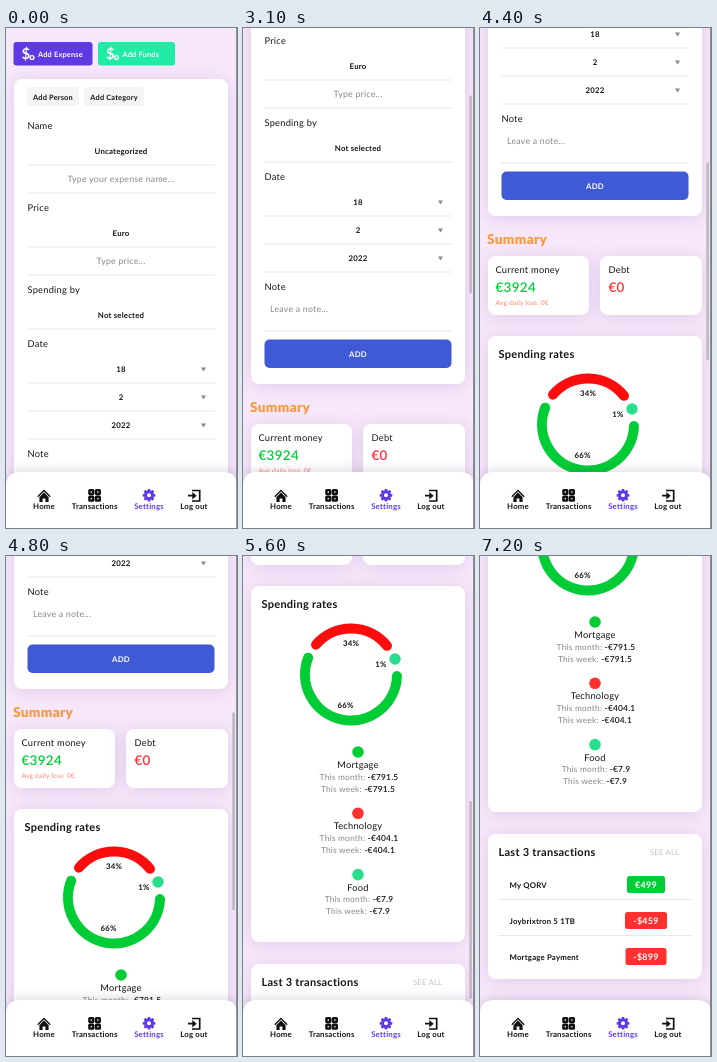
Write an HTML page that moves like this. It is 231x500 px and loops after 9.8 s.

```html
<!DOCTYPE html>
<html lang="en">
<head>
<meta charset="utf-8">
<title>Expense tracker</title>
<style>
  html, body { margin: 0; width: 100%; height: 100%; overflow: hidden; background: #f7e8fb; }
  svg { display: block; width: 100vw; height: 100vh; }
  text { font-family: Lato, "Open Sans", sans-serif; letter-spacing: .025em; fill: #151515; text-rendering: geometricPrecision; }
  .card { fill: #fff; filter: drop-shadow(0 2px 9px rgba(110, 60, 140, .17)); }
  .nav { fill: #fff; filter: drop-shadow(0 -1px 6px rgba(70, 40, 90, .2)); }
  .label { font-size: 9.3px; }
  .bold { font-size: 7.8px; font-weight: 700; }
  .small { font-size: 7.4px; font-weight: 700; }
  .hint { font-size: 8.8px; fill: #888; }
  .title { font-size: 11px; font-weight: 700; }
  .summary { font-size: 13.6px; font-weight: 900; fill: #fb9a3c; }
  .amount { font-size: 13.4px; font-weight: 600; }
  .loss { font-size: 6.7px; fill: #ff866b; }
  .period { font-size: 8.4px; fill: #888; }
  .period tspan { fill: #151515; font-weight: 600; }
  .more { font-size: 7.7px; fill: #c2c2c2; }
  .badge { font-size: 9px; font-weight: 700; fill: #fff; }
  .dollar { font-size: 15px; font-weight: 700; fill: #fff; }
  .white { fill: #fff; }
  .active { fill: #5f39e4; }
</style>
</head>
<body>
<svg viewBox="0 0 231 500" preserveAspectRatio="none">
  <rect width="231" height="500" fill="#f7e8fb"/>
  <g id="page"></g>
  <rect id="thumb" x="226.3" width="2.6" height="198" rx="1.3" fill="#bcb8bf"/>
  <g id="nav"></g>
  <rect x="230.2" width=".8" height="500" fill="#777"/>
</svg>
<script>
const GREEN = '#00cd35', RED = '#ff3030', TEAL = '#2ade8c', PURPLE = '#5f39e4';

const text = (x, y, content, style, anchor = 'start', extra = '') =>
  `<text x="${x}" y="${y}" class="${style}" text-anchor="${anchor}" ${extra}>${content}</text>`;
const centered = (x, y, content, style) => text(x, y, content, style, 'middle');
const box = (x, y, w, h, r, fill) =>
  `<rect x="${x}" y="${y}" width="${w}" height="${h}" rx="${r}" fill="${fill}"/>`;
const card = (x, y, w, h) =>
  `<rect x="${x}" y="${y}" width="${w}" height="${h}" rx="8" class="card"/>`;
const rule = (x, y, w) => box(x, y - .4, w, .8, 0, '#e4e4e4');
const dot = (x, y, r, fill) => `<circle cx="${x}" cy="${y}" r="${r}" fill="${fill}"/>`;

function arc(from, to, color) {
  const point = degrees => {
    const a = degrees * Math.PI / 180;
    return `${108 + 46 * Math.cos(a)} ${731.5 + 46 * Math.sin(a)}`;
  };
  return `<path d="M${point(from)}A46 46 0 ${+(to - from > 180)} 1 ${point(to)}"
    fill="none" stroke="${color}" stroke-width="10" stroke-linecap="round"/>`;
}

const moneyButton = (x, w, label, color) =>
  box(x, 14, w, 23.5, 3, color) + text(x + 8, 31, '$', 'dollar') +
  `<circle cx="${x + 18.5}" cy="29.5" r="1.9" fill="none" stroke="#fff" stroke-width="1.4"/>` +
  text(x + 24.5, 28.5, label, 'small white');

const chip = (x, w, label) =>
  box(x, 59, w, 19, 3, '#f5f5f5') + centered(x + w / 2, 71.5, label, 'small');

function form() {
  const labels = [['Name', 101], ['Price', 183], ['Spending by', 265], ['Date', 319], ['Note', 429]];
  const values = [['Uncategorized', 126], ['Euro', 208], ['Not selected', 290], ['18', 344], ['2', 372], ['2022', 400]];
  const hints = [['Type your expense name...', 154], ['Type price...', 236]];
  const lines = [137, 165, 219, 247, 301, 355, 383, 411, 470];
  return card(8, 51, 214, 472) + chip(21, 52, 'Add Person') + chip(78, 60, 'Add Category') +
    labels.map(([s, y]) => text(21.5, y, s, 'label')).join('') +
    values.map(([s, y]) => centered(115, y, s, 'bold')).join('') +
    hints.map(([s, y]) => centered(115, y, s, 'hint')).join('') +
    lines.map(y => rule(21, y, 188)).join('') +
    [339.5, 367.5, 395.5].map(y => `<path d="M195 ${y}h5l-2.5 4z" fill="#888"/>`).join('') +
    text(27, 451, 'Leave a note...', 'hint') +
    box(21.5, 478.5, 187, 28.5, 5, '#4059d6') + centered(115, 495.5, 'ADD', 'bold white');
}

const summary = () =>
  text(7, 550.5, 'Summary', 'summary') + card(8, 563, 101, 59) + card(120, 563, 102, 59) +
  text(15.5, 580, 'Current money', 'label') + text(15.5, 599, '€3924', 'amount', 'start', `style="fill:${GREEN}"`) +
  text(15.5, 611.5, 'Avg daily loss: 0€', 'loss') +
  text(128.5, 580, 'Debt', 'label') + text(128.5, 599, '€0', 'amount', 'start', `style="fill:${RED}"`);

function rates() {
  const groups = [['Mortgage', '-€791.5', GREEN], ['Technology', '-€404.1', RED], ['Food', '-€7.9', TEAL]];
  return card(8, 643, 214, 356) + text(18.5, 665, 'Spending rates', 'title') +
    arc(2, 201.5, GREEN) + arc(220.5, 321.5, '#fb0d0d') + dot(152, 716, 5.7, TEAL) +
    centered(108, 703, '34%', 'bold') + centered(138, 724, '1%', 'bold') + centered(102.5, 765, '66%', 'bold') +
    groups.map(([name, sum, color], i) => {
      const y = 809 + i * 61.3;
      return dot(115, y, 5.8, color) + centered(115, y + 16, name, 'label') +
        centered(116, y + 27.7, `This month: <tspan>${sum}</tspan>`, 'period') +
        centered(115, y + 39.8, `This week: <tspan>${sum}</tspan>`, 'period');
    }).join('');
}

function transactions() {
  const rows = [['My QORV', '€499', 38, GREEN], ['Joybrixtron 5 1TB', '-$459', 42, RED], ['Mortgage Payment', '-$899', 41, RED]];
  return card(8, 1021, 214, 145) + text(18.5, 1043, 'Last 3 transactions', 'title') +
    text(170, 1042, 'SEE ALL', 'more') + rule(18, 1086.5, 194) + rule(18, 1122.5, 194) +
    rows.map(([name, sum, w, color], i) => {
      const y = 1063 + i * 36;
      return text(29.5, y + 11.5, name, 'bold') + box(166 - w / 2, y, w, 17, 2.5, color) +
        centered(166, y + 11.8, sum, 'badge');
    }).join('');
}

function navigation() {
  const teeth = Array.from({ length: 8 }, (_, i) =>
    `<rect x="141.6" y="461" width="2.8" height="4" rx=".7" fill="${PURPLE}" transform="rotate(${i * 45} 143 467.3)"/>`).join('');
  const tiles = [[82.2, 461], [88.8, 461], [82.2, 467.6], [88.8, 467.6]];
  const icons =
    '<path d="M31.3 468.3L38 461.6l6.7 6.7-1 1-5.7-5.7-5.7 5.7z M33.4 469.2l4.6-4.6 4.6 4.6v4.8h-3.2v-3.4h-2.8v3.4h-3.2z" fill="#111"/>' +
    tiles.map(([x, y]) => box(x, y, 6.2, 6.2, 1.6, '#111') + dot(x + 3.1, y + 3.1, .8, '#fff')).join('') +
    teeth + dot(143, 467.3, 4.9, PURPLE) + dot(143, 467.3, 2, '#fff') +
    '<path d="M186 462.5h7.7v10.5h-7.7M182 467.7h5" fill="none" stroke="#111" stroke-width="1.7"/>' +
    '<path d="M186.3 464l4.4 3.7-4.4 3.7z" fill="#111"/>';
  return '<path d="M0 502V458Q0 444 14 444H217Q231 444 231 458V502z" class="nav"/>' + icons +
    centered(38, 481, 'Home', 'bold') + centered(88.7, 481, 'Transactions', 'bold') +
    centered(143, 481, 'Settings', 'bold active') + centered(188, 481, 'Log out', 'bold');
}

const page = document.getElementById('page');
const thumb = document.getElementById('thumb');
page.innerHTML = moneyButton(7.5, 79, 'Add Expense', PURPLE) + moneyButton(92, 77, 'Add Funds', '#20eca5') +
  form() + summary() + rates() + transactions();
document.getElementById('nav').innerHTML = navigation();

// Each mouse wheel notch scrolls the page by a fixed distance.
const LOOP = 9800, NOTCH = 55.75, MAX_SCROLL = 743;
const notchTimes = [2200, 2500, 3100, 3500, 4000, 4400, 4800, 4900, 5200, 5500, 5600, 5900, 6200, 6600];

function draw(now) {
  const t = now % LOOP;
  const notches = notchTimes.filter(time => time <= t).length;
  const scroll = Math.min(Math.round(notches * NOTCH), MAX_SCROLL);
  const fadeSteps = Math.max(0, Math.floor((t - 6800) / 100));
  page.setAttribute('transform', `translate(0 ${-scroll})`);
  thumb.setAttribute('y', 1 + scroll * .398);
  thumb.setAttribute('opacity', notches ? Math.max(0, 1 - fadeSteps / 4) : 0);
}

function frame() {
  draw(performance.now());
  requestAnimationFrame(frame);
}
frame();
</script>
</body>
</html>
```
